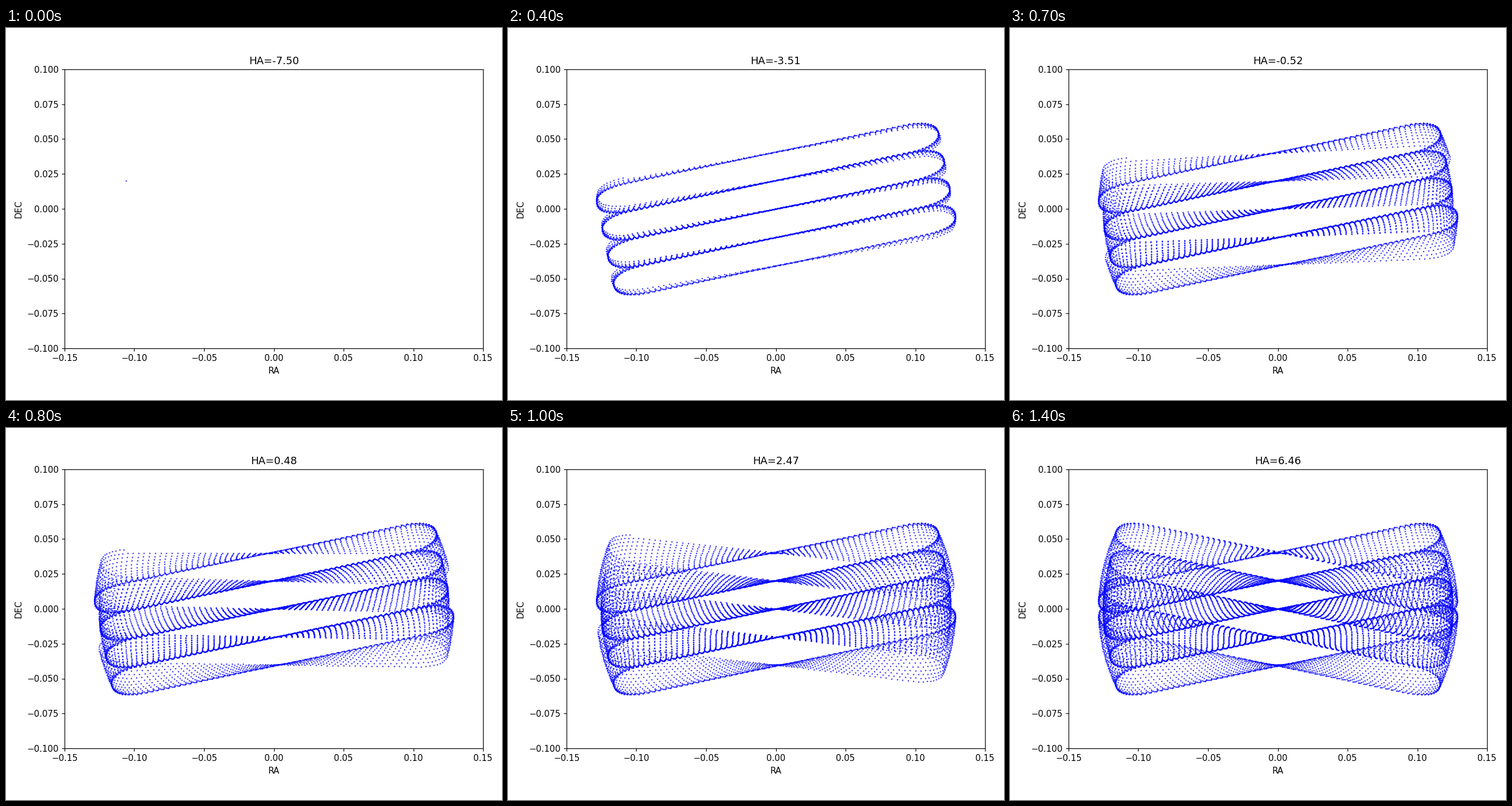
Write a matplotlib script that moves like this. It is 864 by 648 pixels and loops after 1.5 s.

```python
import matplotlib.pyplot as plt
import numpy as np
from matplotlib.animation import FuncAnimation

W, H, DPI = 864, 648, 108
FRAMES, INTERVAL = 15, 100

HA_START = -7.5
HA_STEP = 0.99727        # hours per frame
SAMPLES = 1200           # telescope samples per frame
CYCLE = 600.15           # samples for one pass down and up all rows
HALF_LEN = 0.1
ROW_GAP = 0.02
TURN_REACH = 0.025       # overshoot of each U-turn beyond the row end
MAX_TILT = 0.211         # tangent of the largest field rotation


def row_offset(leg):
    """Height of the row scanned on a leg: down five rows, then back up."""
    return ROW_GAP * (np.abs((leg + 4) % 8 - 4) * -1 + 2)


def scan(i):
    """Telescope offsets in the unrotated scan frame."""
    pos = 8 * i / CYCLE
    leg = np.floor(pos)
    frac = pos - leg
    turn = np.clip(3 * frac - 2, 0, 1)
    along = np.where(frac < 2 / 3,
                     HALF_LEN * (3 * frac - 1),
                     HALF_LEN + 4 * TURN_REACH * turn * (1 - turn))
    ease = np.where(turn < 0.5, 2 * turn**2, 1 - 2 * (1 - turn)**2)
    u = along * np.where(leg % 2 == 0, 1, -1)
    v = row_offset(leg) * (1 - ease) + row_offset(leg + 1) * ease
    return u, v


def sky_track():
    """Sky positions of all samples, turned by the parallactic angle."""
    i = np.arange((FRAMES - 1) * SAMPLES + 1)
    hour = HA_START + HA_STEP * i / SAMPLES
    tilt = -np.arctan(MAX_TILT * np.sin(hour * np.pi / 12))
    u, v = scan(i)
    return (u * np.cos(tilt) - v * np.sin(tilt),
            u * np.sin(tilt) + v * np.cos(tilt))


ra, dec = sky_track()

fig = plt.figure(figsize=(W / DPI, H / DPI), dpi=DPI, facecolor="white")
ax = fig.add_axes([102 / W, 90 / H, 729 / W, 486 / H])
ax.set_xlim(-0.15, 0.15)
ax.set_ylim(-0.1, 0.1)
ax.set_xlabel("RA")
ax.set_ylabel("DEC")
title = ax.set_title("")
dots, = ax.plot([], [], "b.", markersize=1)


def draw(n):
    count = n * SAMPLES + 1
    dots.set_data(ra[:count], dec[:count])
    title.set_text(f"HA={HA_START + n * HA_STEP:.2f}")
    return dots, title


anim = FuncAnimation(fig, draw, frames=FRAMES, interval=INTERVAL,
                     init_func=lambda: draw(0), repeat=True, repeat_delay=0)
plt.show()
```
